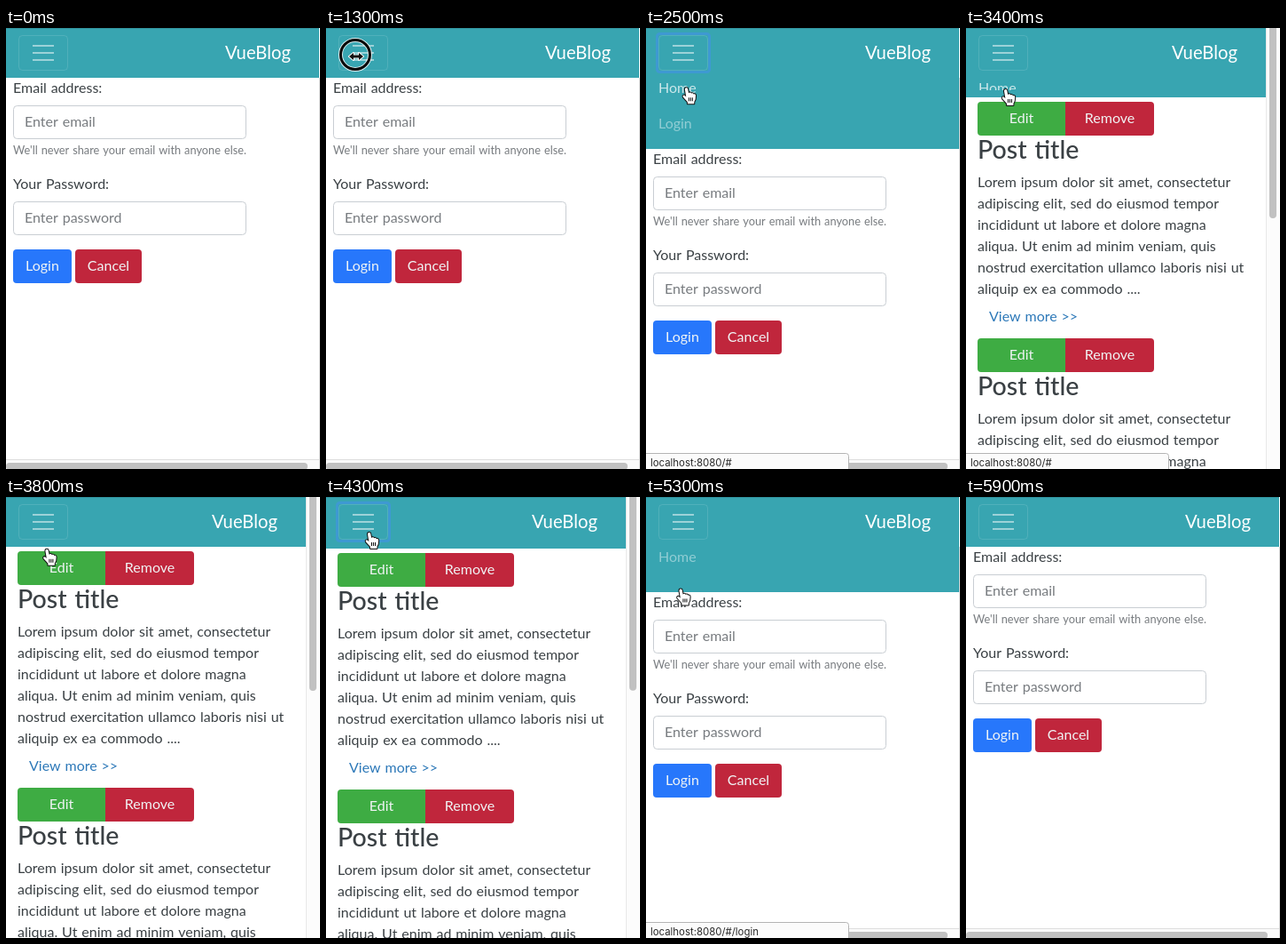
These frames come from a looping animation (354 px wide and 496 px high, 6100 ms). An HTML page with a canvas:

```html
<!DOCTYPE html>
<html lang="en">
<head>
<meta charset="utf-8">
<title>Blog navigation</title>
<style>
  html, body { margin: 0; width: 100%; height: 100%; overflow: hidden; background: #fff; }
  canvas { display: block; }
</style>
</head>
<body>
<canvas id="stage" width="354" height="496"></canvas>
<script>
const ctx = document.getElementById('stage').getContext('2d');
const W = 354, H = 496, LOOP = 6100, STEP = 100;
const MENU_HEIGHT = 80, MENU_TIME = 350;
const INK = '#3a4044', MUTED = '#777b7f', TEAL = '#38a5b1', RED = '#c0263c';

const LOREM = [
  'Lorem ipsum dolor sit amet, consectetur',
  'adipiscing elit, sed do eiusmod tempor',
  'incididunt ut labore et dolore magna',
  'aliqua. Ut enim ad minim veniam, quis',
  'nostrud exercitation ullamco laboris nisi ut',
  'aliquip ex ea commodo ....'
];

// Menu clicks: time and whether the menu opens.
const TOGGLES = [[1955, true], [3249, false], [4284, true], [5220, false]];

// Pointer path: time, x, y of the hot spot.
const RING_PATH = [[100, 340, 454], [700, 299, 297], [1300, 33, 30]];
const HAND_PATH = [
  [1600, 40, 27], [1955, 41, 27], [2300, 46, 67], [3200, 45, 69], [3600, 45, 69],
  [4100, 49, 40], [4300, 49, 40], [4600, 47, 71], [4950, 39, 103], [5700, 40, 104]
];

const HAND = new Path2D('M-2 2C-2-.6 1-.6 1.3 1.5L2.2 6C3 4.8 5 5 5.2 6.5' +
  'C6 5.6 7.7 6 7.8 7.4C8.8 6.6 10.2 7.2 10.2 9L9.8 13L8.4 16V18H1V16' +
  'L-4 10.5C-5 8.6-3 7.6-1.8 9L-.6 10.2Z');
const RESIZE = new Path2D('M-8 0L-3-4V-1.5H3V-4L8 0L3 4V1.5H-3V4Z');

const between = (t, from, to) => t >= from && t < to;

// CSS "ease": cubic-bezier(.25, .1, .25, 1)
function ease(x) {
  if (x <= 0 || x >= 1) return x <= 0 ? 0 : 1;
  const bezier = (s, a, b) => 3 * s * (1 - s) ** 2 * a + 3 * s * s * (1 - s) * b + s ** 3;
  let lo = 0, hi = 1;
  for (let i = 0; i < 20; i++) {
    const mid = (lo + hi) / 2;
    if (bezier(mid, .25, .25) < x) lo = mid; else hi = mid;
  }
  return bezier(lo, .1, 1);
}

function menuShift(t) {
  let shift = 0;
  for (const [start, opens] of TOGGLES) {
    if (t < start) break;
    const p = ease((t - start) / MENU_TIME);
    shift = MENU_HEIGHT * (opens ? p : 1 - p);
  }
  return Math.round(shift);
}

function along(path, t) {
  const i = path.findIndex(p => p[0] > t);
  if (i < 0) return path[path.length - 1].slice(1);
  if (i === 0) return path[0].slice(1);
  const [t0, x0, y0] = path[i - 1], [t1, x1, y1] = path[i];
  const u = (t - t0) / (t1 - t0), k = u * u * (3 - 2 * u);
  return [x0 + (x1 - x0) * k, y0 + (y1 - y0) * k];
}

function rect(x, y, w, h, color) {
  ctx.fillStyle = color;
  ctx.fillRect(x, y, w, h);
}

function rounded(x, y, w, h, radius, fill, stroke) {
  ctx.beginPath();
  ctx.roundRect(x, y, w, h, radius);
  if (fill) { ctx.fillStyle = fill; ctx.fill(); }
  if (stroke) { ctx.strokeStyle = stroke; ctx.stroke(); }
}

function text(str, x, y, color = INK, { size = 16, weight = 400, align = 'left', family = 'Lato' } = {}) {
  ctx.font = `${weight} ${size}px ${family}, sans-serif`;
  ctx.wordSpacing = `${size * .05}px`;
  ctx.textAlign = align;
  ctx.fillStyle = color;
  ctx.fillText(str, x, y);
}

function input(y, placeholder) {
  rounded(8.5, y + .5, 262, 37, 4, '#fff', '#c9ced3');
  text(placeholder, 21, y + 24, MUTED);
}

function button(x, y, w, label, color, radius = 4) {
  rounded(x, y, w, 38, radius, color);
  text(label, x + w / 2, y + 24, '#f0f4f5', { align: 'center' });
}

function loginPage(shift) {
  ctx.save();
  ctx.translate(0, shift);
  text('Email address:', 8, 73);
  input(87, 'Enter email');
  text("We'll never share your email with anyone else.", 8, 142, MUTED, { size: 12.8 });
  text('Your Password:', 8, 181);
  input(195, 'Enter password');
  button(8, 249, 66, 'Login', '#2777fb');
  button(78, 249, 75, 'Cancel', RED);
  ctx.restore();
  rect(0, 485, W, 1, '#dedede');
  rect(0, 486, W, 10, '#fafafa');
  rounded(0, 489, 340, 8, 4, '#c1c1c1');
  rect(353, 56, 1, 440, '#d5d5d5');
}

function post(y) {
  button(13, y, 99, 'Edit', '#3eac43', [4, 0, 0, 4]);
  button(112, y, 100, 'Remove', RED, [0, 4, 4, 0]);
  text('Post title', 13, y + 64, INK, { size: 28.6, weight: 500 });
  LOREM.forEach((line, i) => text(line, 13, y + 96 + Math.round(i * 23.9)));
  text('View more >>', 26, y + 247, '#2c78b8');
}

function postsPage(shift) {
  for (let y = 61 + shift; y < H; y += 266) post(y);
  rect(338, 0, 16, H, '#fcfcfc');
  rect(338, 0, 1, H, '#e8e8e8');
  rounded(342, -6, 8, 224 - shift * .18, 4, '#c1c1c1');
}

function navbar(shift, width, t) {
  const height = 56 + shift;
  rect(0, 0, width, height, TEAL);
  rect(0, 0, width, 1, '#31929d');
  rounded(14.5, 8.5, 55, 39, 4, null, 'rgba(255,255,255,.12)');
  ctx.strokeStyle = 'rgba(255,255,255,.5)';
  ctx.lineWidth = 2;
  ctx.beginPath();
  for (const y of [20, 28, 36]) { ctx.moveTo(30, y); ctx.lineTo(54, y); }
  ctx.stroke();
  if (between(t, 1955, 3240) || between(t, 4250, 5220)) {
    ctx.lineWidth = 3;
    rounded(12.5, 6.5, 59, 43, 3, null, 'rgba(68,145,232,.6)');
  }
  ctx.lineWidth = 1;
  text('VueBlog', width - 32, 34.5, '#fff', { size: 20.3, align: 'right' });

  if (!shift) return;
  ctx.save();
  ctx.beginPath();
  ctx.rect(0, 48, width, height - 56);
  ctx.clip();
  const onHome = between(t, 2200, 3500) || between(t, 4550, 4850);
  const onLogin = between(t, 4850, 5600);
  const tint = hover => `rgba(255,255,255,${hover ? .75 : .45})`;
  text('Home', 14, 73, tint(onHome));
  text('Login', 14, 113, tint(onLogin));
  ctx.restore();
}

function statusBar(t) {
  const home = between(t, 2300, 3700) || between(t, 4700, 4900);
  const login = between(t, 4900, 5700);
  if (!home && !login) return;
  rounded(-4.5, 478.5, 233, 24, 3, '#fbfbfb', '#b4b4b4');
  text('localhost:8080/#' + (login ? '/login' : ''), 5, 493, '#2a2a2a', { size: 11.4, family: 'Inter' });
}

function ring(radius, width, color) {
  ctx.beginPath();
  ctx.arc(0, 0, radius, 0, Math.PI * 2);
  ctx.lineWidth = width;
  ctx.strokeStyle = color;
  ctx.stroke();
}

function shape(path, fill, outline) {
  ctx.lineWidth = 2;
  ctx.lineJoin = 'round';
  ctx.strokeStyle = outline;
  ctx.stroke(path);
  ctx.fillStyle = fill;
  ctx.fill(path);
}

function pointer(t) {
  if (!between(t, 100, 5700)) return;
  const ringed = t < 1600;
  ctx.save();
  ctx.translate(...along(ringed ? RING_PATH : HAND_PATH, t));
  if (ringed) {
    ring(16.5, 5, 'rgba(255,255,255,.8)');
    ring(16.5, 3, '#080808');
    ctx.translate(1, 2);
    shape(RESIZE, '#111', '#fff');
  } else {
    shape(HAND, '#fff', '#111');
    ctx.lineWidth = 1;
    ctx.beginPath();
    for (const x of [2.5, 4.5, 6.5]) { ctx.moveTo(x, 11); ctx.lineTo(x, 15); }
    ctx.stroke();
  }
  ctx.restore();
}

function draw(t) {
  const shift = menuShift(t);
  const onPosts = between(t, 3240, 5220);
  ctx.lineWidth = 1;
  rect(0, 0, W, H, '#fff');
  (onPosts ? postsPage : loginPage)(shift);
  navbar(shift, onPosts ? 338 : 353, t);
  statusBar(t);
  pointer(t);
}

function frame() {
  const t = performance.now() % LOOP;
  draw(Math.floor(t / STEP) * STEP);
  requestAnimationFrame(frame);
}
frame();
</script>
</body>
</html>
```
